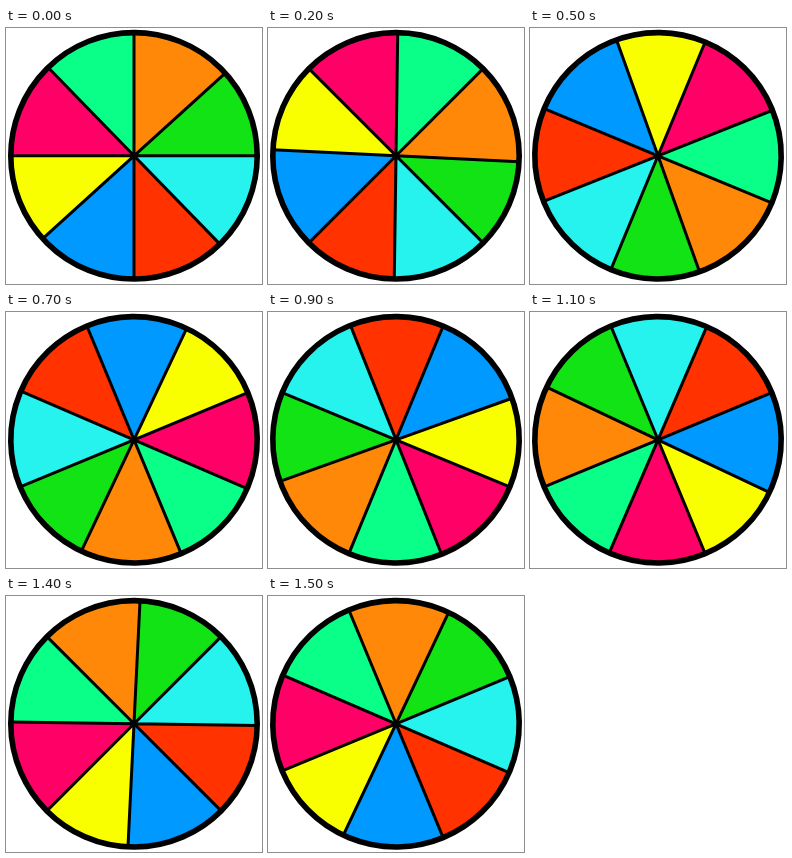
Recreate the animation shown at these times as an HTML page with a canvas. Size 256x256 px, loop 1600 ms.

```html
<!DOCTYPE html>
<html lang="en">
<head>
<meta charset="utf-8">
<title>Spinning wheel</title>
<style>
  html, body { margin: 0; height: 100%; overflow: hidden; background: #fff; }
  canvas { display: block; }
</style>
</head>
<body>
<canvas id="stage" width="256" height="256"></canvas>
<script>
const ctx = document.getElementById('stage').getContext('2d');
const TURN = 2 * Math.PI, STEPS = 16, STEP_MS = 100, RADIUS = 123.2;
const colors = ['#ff8808', '#11e314', '#26f2ee', '#ff3200',
                '#0099ff', '#faff00', '#ff0066', '#0aff88'];
// Four diameters, in degrees clockwise from the top, bound the slices.
const spokes = [0, 47.8, 90, 135.8];
const edge = i => (spokes[i % 4] + 180 * Math.floor(i / 4) - 90) * TURN / 360;

function draw(now) {
  const step = Math.floor(now / STEP_MS) % STEPS;
  ctx.clearRect(0, 0, 256, 256);
  ctx.save();
  ctx.translate(128, 127.8);
  ctx.rotate(step / STEPS * TURN);

  colors.forEach((color, i) => {
    ctx.beginPath();
    ctx.moveTo(0, 0);
    ctx.arc(0, 0, RADIUS, edge(i), edge(i + 1));
    ctx.fillStyle = color;
    ctx.fill();
  });

  ctx.beginPath();
  colors.forEach((_, i) => {
    ctx.moveTo(0, 0);
    ctx.lineTo(RADIUS * Math.cos(edge(i)), RADIUS * Math.sin(edge(i)));
  });
  ctx.lineWidth = 3;
  ctx.stroke();

  ctx.beginPath();
  ctx.arc(0, 0, RADIUS, 0, TURN);
  ctx.lineWidth = 5.6;
  ctx.stroke();
  ctx.restore();
}

const start = performance.now();
function tick() {
  draw(performance.now() - start);
  requestAnimationFrame(tick);
}
tick();
</script>
</body>
</html>
```
